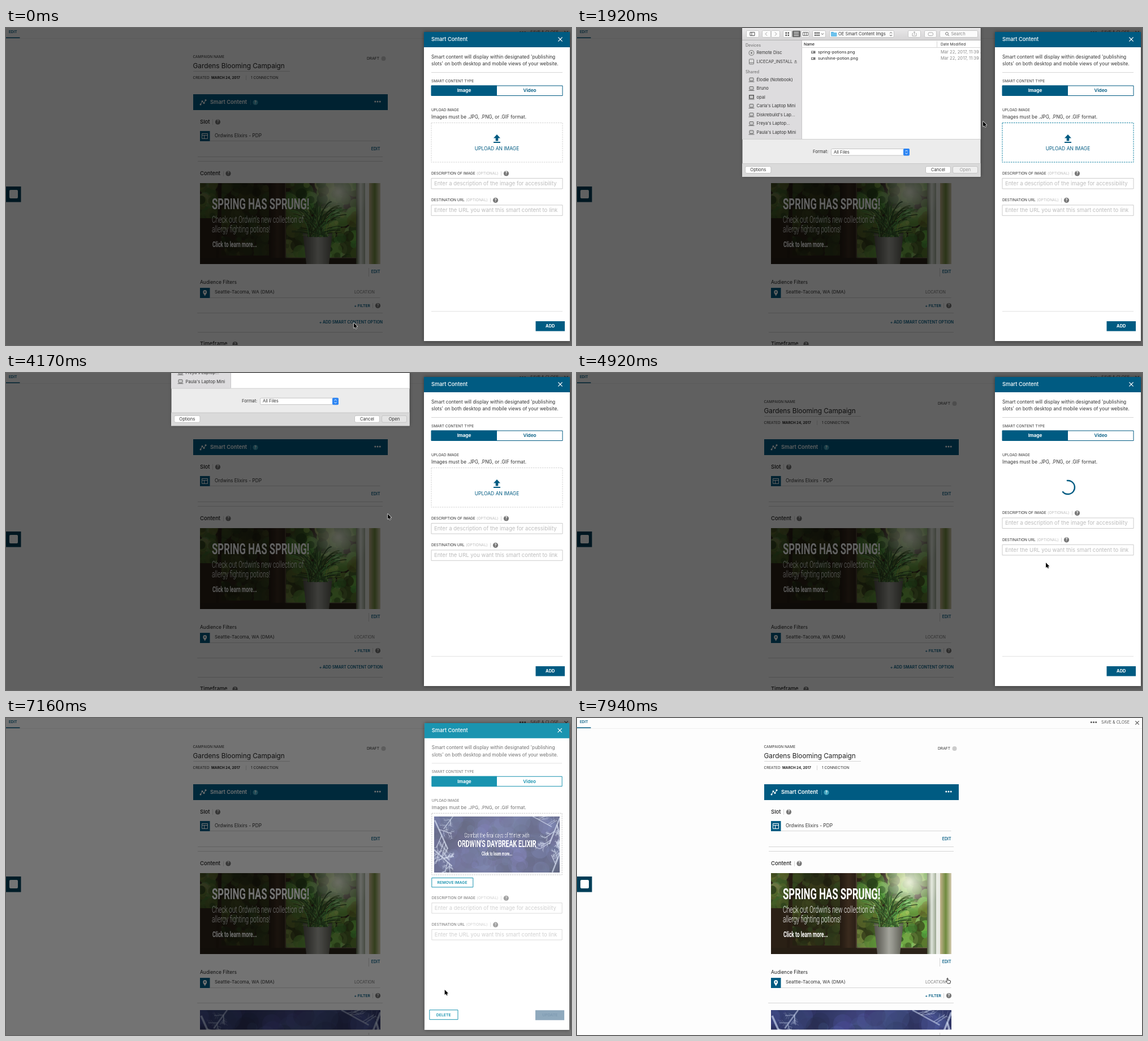
An HTML page with a canvas for the animation above (8 s loop, 999 by 560 pixels).

```html
<!DOCTYPE html>
<html lang="en">
<head>
<meta charset="utf-8">
<title>Smart Content</title>
<style>
html, body { margin: 0; width: 999px; height: 560px; overflow: hidden; background: #fdfdfd; }
canvas { display: block; }
</style>
</head>
<body>
<canvas id="stage" width="999" height="560"></canvas>
<script>
const BLUE = '#005b82', TEAL = '#1a94b0', INK = '#333', RULE = '#d6d6d6';
const LOOP = 8000, STEP = 150;
const stage = document.getElementById('stage').getContext('2d');
let c = stage;

// ---- drawing helpers ----
function box(x, y, w, h, fill, stroke, r = 0) {
  c.beginPath();
  c.roundRect(x, y, w, h, r);
  if (fill) { c.fillStyle = fill; c.fill(); }
  if (stroke) { c.strokeStyle = stroke; c.lineWidth = 1; c.stroke(); }
}
function line(color, width, ...p) {
  c.beginPath();
  for (let i = 0; i < p.length; i += 2) c.lineTo(p[i], p[i + 1]);
  c.strokeStyle = color;
  c.lineWidth = width;
  c.stroke();
}
function dot(x, y, r, color) {
  c.beginPath();
  c.arc(x, y, r, 0, 7);
  c.fillStyle = color;
  c.fill();
}
function text(s, x, y, size, color = INK, weight = 400, align = 'left', face = 'Inter') {
  c.font = `${weight} ${size}px ${face}, sans-serif`;
  c.textAlign = align;
  c.textBaseline = 'middle';
  c.fillStyle = color;
  c.fillText(s, x, y);
  return c.measureText(s).width;
}
function condensed(s, x, y, size, weight, align) {
  c.save();
  c.translate(x, y);
  c.scale(.62, 1);
  text(s, 0, 0, size, '#fff', weight, align, 'Roboto');
  c.restore();
}
function help(x, y, color = '#777') {
  dot(x, y, 4.6, color);
  text('?', x, y + .3, 7, '#fff', 700, 'center');
}
function cross(x, y, r, color) {
  line(color, 1.2, x - r, y - r, x + r, y + r);
  line(color, 1.2, x + r, y - r, x - r, y + r);
}
function ellipsis(x, y, color) {
  for (let i = -1; i < 2; i++) dot(x + i * 4.2, y, 1.5, color);
}
function polygon(color, ...p) {
  c.beginPath();
  for (let i = 0; i < p.length; i += 2) c.lineTo(p[i], p[i + 1]);
  c.fillStyle = color;
  c.fill();
}

// ---- banners, 319 x 143, painted once ----
let seed;
const rnd = () => (seed = seed * 16807 % 2147483647) / 2147483647;

function bake(start, paint) {
  const cv = document.createElement('canvas');
  cv.width = 638;
  cv.height = 286;
  c = cv.getContext('2d');
  c.scale(2, 2);
  seed = start;
  paint();
  c = stage;
  return cv;
}
function blobs(x, y, w, h, n, size, color) {
  c.save();
  c.beginPath();
  c.rect(x, y, w, h);
  c.clip();
  for (let i = 0; i < n; i++) dot(x + rnd() * w, y + rnd() * h, size * (.3 + rnd()), color());
  c.restore();
}
function gradient(x1, y1, x2, y2, ...colors) {
  const g = c.createLinearGradient(x1, y1, x2, y2);
  colors.forEach((k, i) => g.addColorStop(i / (colors.length - 1), k));
  return g;
}

const spring = bake(77, () => {
  const leaf = (lo, span) => () => `hsla(${72 + rnd() * 38},45%,${lo + rnd() * span}%,.75)`;
  box(0, 0, 319, 143, '#33271b');
  blobs(0, 0, 32, 62, 70, 9, leaf(20, 45));
  blobs(38, 0, 84, 128, 160, 10, leaf(9, 32));
  blobs(152, 0, 128, 132, 240, 11, leaf(18, 42));
  box(122, 0, 30, 143, gradient(122, 0, 152, 0, '#241a13', '#513c2b', '#2b2018'));
  line('#8a765c', 1.2, 151, 0, 151, 132);
  line('#2a1f15', 5, 36, 0, 30, 143);
  box(0, 132, 319, 11, '#2b2319');
  line('#796b56', 1, 152, 132, 300, 132);
  box(276, 0, 16, 143, gradient(276, 0, 292, 0, '#4e5a3c', '#dfe5dc', '#9aa690'));
  box(299, 0, 20, 143, gradient(299, 0, 319, 0, '#c3b38e', '#6f8a3e', '#d7ccb2'));
  box(292, 0, 7, 143, '#e8ebe4');
  const glow = c.createRadialGradient(245, 16, 2, 245, 16, 55);
  glow.addColorStop(0, 'rgba(255,255,240,.85)');
  glow.addColorStop(1, 'rgba(255,255,240,0)');
  box(190, 0, 110, 80, glow);
  polygon(gradient(183, 0, 234, 0, '#62635c', '#a9aaa2', '#5a5a50'), 182, 88, 234, 88, 228, 143, 188, 143);
  for (let i = 0; i < 110; i++) {
    const x = 158 + rnd() * 104, y = 32 + rnd() * 60;
    c.beginPath();
    c.moveTo(190 + rnd() * 36, 95);
    c.quadraticCurveTo(208 + (x - 208) * .4, y, x, y);
    c.strokeStyle = `hsl(${85 + rnd() * 30},36%,${15 + rnd() * 36}%)`;
    c.lineWidth = 1.3;
    c.stroke();
  }
  box(0, 0, 319, 143, gradient(0, 0, 215, 0, 'rgba(34,25,16,.45)', 'rgba(34,25,16,.68)', 'rgba(34,25,16,0)'));
  condensed('SPRING HAS SPRUNG!', 21, 38, 27, 600);
  condensed("Check out Ordwin's new collection of", 21, 65, 16.4, 300);
  condensed('allergy fighting potions!', 21, 82, 16.4, 300);
  condensed('Click to learn more...', 22, 109, 13.6, 700);
});

function twig(x, y, angle, len, depth) {
  const x2 = x + Math.cos(angle) * len, y2 = y + Math.sin(angle) * len;
  line(`rgba(205,217,240,${.28 + depth * .13})`, .8 + depth * .9, x, y, x2, y2);
  if (!depth) return;
  for (let i = 0; i < 5; i++) {
    const k = .2 + rnd() * .8;
    twig(x + (x2 - x) * k, y + (y2 - y) * k, angle + (rnd() < .5 ? -1 : 1) * (.5 + rnd() * .6), len * .42, depth - 1);
  }
}
const frost = bake(31, () => {
  box(0, 0, 319, 143, gradient(0, 0, 319, 143, '#1c2146', '#454d83', '#20264f'));
  blobs(0, 0, 319, 143, 150, 20, () => `hsla(${222 + rnd() * 25},34%,${18 + rnd() * 34}%,.28)`);
  twig(2, 10, 1.15, 80, 3);
  twig(0, 85, .75, 62, 3);
  twig(48, 0, 2.2, 40, 2);
  twig(319, 4, 1.95, 72, 3);
  twig(300, 143, -1.2, 62, 3);
  twig(250, 0, .5, 55, 2);
  condensed('Combat the final days of Winter with', 159.5, 49, 16.8, 300, 'center');
  condensed("ORDWIN'S DAYBREAK ELIXIR", 159.5, 71, 24.5, 600, 'center');
  condensed('Click to learn more...', 159.5, 96, 13.4, 700, 'center');
});

// ---- campaign page ----
function tile(y) { box(343, y, 17.5, 18, BLUE); }

function page(added) {
  box(0, 0, 999, 560, '#fdfdfd');
  line('#efefef', 1, 0, 18.5, 999, 18.5);
  text('EDIT', 5, 7.5, 6.4, BLUE, 600);
  box(0, 16.5, 24.5, 1.5, BLUE);
  ellipsis(913.5, 7.5, '#555');
  text('SAVE & CLOSE', 927, 8, 7.1, '#555');
  cross(990.5, 8.5, 3.2, '#555');

  text('CAMPAIGN NAME', 330.5, 51.5, 6.5);
  text('Gardens Blooming Campaign', 330.5, 67.5, 11.8, '#222');
  line(RULE, 1, 331, 76.5, 502, 76.5);
  text('CREATED', 330.5, 88, 6.4);
  text('MARCH 24, 2017', 363, 88, 6.2, '#222', 700);
  line(RULE, 1, 424.5, 84, 424.5, 92);
  text('1 CONNECTION', 433, 88, 6.5);
  text('DRAFT', 638, 54, 6.7);
  dot(667.5, 54, 4, '#ccc');

  box(331, 117, 344, 28, BLUE);
  line('#fff', 1, 344, 135, 347, 129.5, 350, 132.5, 353, 127.5);
  [[344, 135], [347, 129.5], [350, 132.5], [353, 127.5]].forEach(p => dot(...p, 1.5, '#fff'));
  text('Smart Content', 361, 131.5, 9.3, '#fff', 600);
  line('#2f7d9c', 1, 432.5, 127, 432.5, 136);
  help(441, 131.5, '#3fa3bd');
  ellipsis(657, 130, '#fff');

  text('Slot', 343, 166.5, 9.5, '#222', 500);
  line(RULE, 1, 365.5, 161, 365.5, 171);
  help(374.5, 166);
  tile(182);
  box(346.5, 186.5, 10, 9, null, '#fff');
  line('#fff', 1, 346.5, 189.5, 356.5, 189.5);
  line('#fff', 1, 350.5, 189.5, 350.5, 195.5);
  text('Ordwins Elixirs - PDP', 369, 191, 8.3);
  line(RULE, 1, 361, 199.5, 661.5, 199.5);
  text('EDIT', 661.5, 214, 7, BLUE, 600, 'right');
  line(RULE, 1, 339, 227.5, 666, 227.5);
  line(RULE, 1, 339, 235.5, 666, 235.5);

  text('Content', 343, 257.5, 9.5, '#222', 500);
  line(RULE, 1, 384.5, 253, 384.5, 262);
  help(393, 257);
  c.drawImage(spring, 343, 274, 319, 143);
  line(RULE, 1, 641.5, 424, 641.5, 439);
  text('EDIT', 661.5, 431, 7, BLUE, 600, 'right');
  text('Audience Filters', 343, 449.5, 8.5, '#222');
  tile(459);
  dot(351.7, 466.5, 3.4, '#fff');
  polygon('#fff', 348.5, 468, 354.9, 468, 351.7, 473.5);
  dot(351.7, 466.5, 1.3, BLUE);
  text('Seattle-Tacoma, WA (DMA)', 369, 467, 8.2);
  text('LOCATION', 616, 467, 7.1, '#777');
  line(RULE, 1, 361, 476.5, 661.5, 476.5);
  text('+ FILTER', 644, 490.5, 6.8, BLUE, 600, 'right');
  line(RULE, 1, 648.5, 486, 648.5, 495);
  help(657.5, 490.5);
  line(RULE, 1, 338, 503.5, 666, 503.5);

  if (added) {
    c.save();
    c.beginPath();
    c.rect(343, 516, 319, 34.5);
    c.clip();
    c.drawImage(frost, 343, 516, 319, 143);
    c.restore();
    line(RULE, 1, 641.5, 556, 641.5, 560);
  } else {
    text('+ ADD SMART CONTENT OPTION', 666, 520, 6.9, BLUE, 600, 'right');
    line(RULE, 1, 339, 537.5, 666, 537.5);
    text('Timeframe', 343, 558.5, 9.4, '#222', 500);
    help(405, 558.5);
  }
  box(0, 280, 26.5, 27.5, '#003d57');
  box(6, 286, 15, 15, '#fff', null, 2);
}

// ---- side panel ----
function field(label, hint, y) {
  let x = 752 + text(label, 752, y, 6.6, INK) + 2.5;
  x += text('(OPTIONAL)', x, y, 6.6, '#bbb') + 5;
  line(RULE, 1, x, y - 4, x, y + 4);
  help(x + 9, y);
  box(752, y + 8.5, 232, 18.5, '#fff', '#ccc');
  text(hint, 757, y + 18, 9.5, '#bcbcbc');
}

function panel(t, edit) {
  const main = edit ? TEAL : BLUE;
  const loading = t >= 4320 && t < 5220, loaded = t >= 5220;
  c.save();
  c.shadowColor = 'rgba(0,0,0,.45)';
  c.shadowBlur = 6;
  box(739, 7, 258, 546, '#fff');
  c.restore();
  box(739, 7, 258, 27, main);
  text('Smart Content', 752, 20.5, 9.3, '#fff', 500);
  cross(980, 20, 3.6, '#fff');

  c.save();
  if (edit) c.globalAlpha *= .7;
  text("Smart content will display within designated 'publishing", 752, 51, 8.4);
  text("slots' on both desktop and mobile views of your website.", 752, 63.5, 8.4);
  line(RULE, 1, 752, 78.5, 984, 78.5);
  text('SMART CONTENT TYPE', 752, 94, 6.5);
  text('UPLOAD IMAGE', 752, 145, 6.5);
  text('Images must be .JPG, .PNG, or .GIF format.', 752, 157.5, 8.25);

  if (loading) {
    const a = (t - 4920) / 1000 * 2 * Math.PI - 1.75;
    c.beginPath();
    c.arc(868, 202, 12, a, a + 4.25);
    c.strokeStyle = main;
    c.lineWidth = 2.4;
    c.stroke();
  } else {
    const hover = t >= 720 && t < 2220;
    c.setLineDash([2.5, 1.5]);
    box(752, 167.5, 232, loaded ? 109.5 : 69.5, null, hover ? '#1683a3' : loaded ? '#aaa' : '#d2d2d2');
    c.setLineDash([]);
    if (loaded) {
      c.save();
      c.globalAlpha *= Math.min(1, .4 + (t - 5220) / 500);
      c.drawImage(frost, 756, 173, 224, 99.5);
      c.restore();
    } else {
      polygon(main, 868, 188, 874, 194.5, 870.3, 194.5, 870.3, 199.5, 865.7, 199.5, 865.7, 194.5, 862, 194.5);
      box(862, 201, 12, 2, main);
      text('UPLOAD AN IMAGE', 868, 213.5, 8.5, main, 400, 'center');
    }
  }
  const dy = loading ? -9.5 : loaded ? 61.5 : 0;
  field('DESCRIPTION OF IMAGE', 'Enter a description of the image for accessibility', 257 + dy);
  field('DESTINATION URL', 'Enter the URL you want this smart content to link', 304.3 + dy);
  c.restore();

  box(752, 102, 232, 17.5, '#fff', main);
  box(752, 101.5, 116, 18.5, main);
  text('Image', 810, 111, 8.2, '#fff', 700, 'center');
  text('Video', 926, 111, 8.2, main, 600, 'center');
  if (loaded) {
    box(752, 282.5, 73.5, 16.5, '#fff', main);
    text('REMOVE IMAGE', 788.5, 291, 6.9, main, 600, 'center');
  }
  if (edit) {
    box(748, 517.5, 50.5, 17, '#fff', main);
    text('DELETE', 773, 526.3, 6.9, main, 600, 'center');
    box(936.5, 518, 51.5, 17.5, '#8fa9bd');
    text('UPDATE', 962.5, 526.8, 6.9, '#7f9bb2', 600, 'center');
  } else {
    line('#e2e2e2', 1, 752, 500.5, 984, 500.5);
    box(936.5, 518, 51.5, 17.5, t >= 6410 ? '#00496a' : BLUE);
    text('ADD', 962.3, 526.8, 7.5, '#fff', 700, 'center');
  }
}

// ---- file chooser ----
const shared = ['Élodie (Notebook)', 'Bruno', 'opal', "Carla's Laptop Mini", "Diskrebuild's Lap...", "Freya's Laptop...", "Paula's Laptop Mini"];

function button(label, x, w, color = INK, fill = '#fff') {
  box(x + .5, 244.5, w, 12, fill, '#c4c4c4', 2.5);
  text(label, x + w / 2 + .5, 250.5, 7.6, color, 400, 'center');
}
function laptop(x, y, color = '#666') {
  box(x - 3.5, y - 3.5, 7, 5.5, '#ccc', color, 1);
  line(color, 1, x - 5, y + 3.5, x + 5, y + 3.5);
}

function fileRow(name, y, on) {
  if (on) box(397, y - 5.3, 316, 10.6, '#0b59d6');
  box(414, y - 2, 7.5, 4.5, '#777');
  box(415, y - 1, 3, 2, '#eee');
  text(name, 426, y, 7.25, on ? '#fff' : '#222');
  text('Mar 22, 2017, 11:39 AM', 643, y, 7.6, on ? '#fff' : '#888');
}

function chooser(y, picked) {
  c.save();
  c.beginPath();
  c.rect(285, 0, 436, 270);
  c.clip();
  c.translate(0, y);
  c.save();
  c.shadowColor = 'rgba(0,0,0,.5)';
  c.shadowBlur = 5;
  box(292.5, -5, 421, 267, '#ececec');
  c.restore();
  c.beginPath();
  c.rect(292, -5, 421.5, 268);
  c.clip();

  box(292, -5, 422, 26.5, gradient(0, 0, 0, 21, '#e9e8e9', '#d5d4d5'));
  line('#b4b4b4', 1, 292, 21.5, 714, 21.5);
  [[299, 22], [327, 15], [343, 15], [364, 15], [380, 15], [396, 14], [416, 23], [446, 114], [585, 22], [614, 21], [641, 67]]
    .forEach(([x, w]) => box(x + .5, 4.5, w, 12, x === 380 ? '#666' : '#fbfbfb', '#c6c6c6', 2));
  box(306, 7.5, 8, 6, null, '#555');
  line('#555', 1, 309, 7.5, 309, 13.5);
  line('#999', 1, 336, 7.5, 333, 10.5, 336, 13.5);
  line('#999', 1, 350, 7.5, 353, 10.5, 350, 13.5);
  for (let i = 0; i < 3; i++) {
    line('#fff', 1, 383.5, 7.5 + i * 3, 392, 7.5 + i * 3);
    box(399.5 + i * 3, 7.5, 3, 6, null, '#666');
    for (let j = 0; j < 2; j++) {
      if (i < 2) box(368.5 + i * 4, 7.5 + j * 4, 2.5, 2.5, '#555');
      box(420 + i * 3.3, 7.5 + j * 4, 2.3, 2.5, '#555');
    }
  }
  line('#555', 1, 432, 9.5, 434, 11.5, 436, 9.5);
  box(449, 7, 5, 3, '#45a8dd', null, 1);
  box(449, 8, 10.5, 7, '#6cc1ec', null, 1);
  text('OE Smart Content Imgs', 462, 10.5, 7.6);
  line('#555', 1, 553, 9.5, 555, 7.5, 557, 9.5);
  line('#555', 1, 553, 12, 555, 14, 557, 12);
  const tool = picked ? '#555' : '#aaa';
  line(tool, 1, 594, 9.5, 593, 9.5, 593, 14, 600, 14, 600, 9.5, 599, 9.5);
  line(tool, 1, 596.5, 12, 596.5, 6.5);
  line(tool, 1, 594.8, 8, 596.5, 6.3, 598.2, 8);
  box(621, 8, 8.5, 5.5, null, tool, 2);
  c.beginPath();
  c.arc(654, 10, 2.4, 0, 7);
  c.strokeStyle = '#777';
  c.stroke();
  line('#777', 1, 656, 12, 658, 14);
  text('Search', 661.5, 10.5, 7.6, '#888');

  box(292, 22, 105, 174.5, '#dddcde');
  text('Devices', 298, 31, 7.1, '#777', 500);
  dot(308.5, 44, 5, '#888');
  dot(308.5, 44, 3.8, '#ddd');
  dot(308.5, 44, 1.6, '#777');
  text('Remote Disc', 317.5, 44, 7.6);
  box(304.5, 55, 8, 9, '#ddd', '#777', 1);
  line('#777', 1, 304.5, 61.5, 312.5, 61.5);
  text('LICECAP_INSTALL', 317.5, 59.5, 7.3);
  polygon('#777', 384, 59.5, 389, 59.5, 386.5, 56.5);
  line('#777', 1, 384, 61.5, 389, 61.5);
  text('Shared', 298, 78, 7.1, '#777', 500);
  shared.forEach((name, i) => {
    const cy = 91.5 + i * 15.5;
    if (i === 2) box(304.5, cy - 4, 8, 6, '#555', '#444');
    laptop(308.5, cy);
    text(name, 317.5, cy, 7.55);
  });

  box(397, 22, 317, 174.5, '#fff');
  line('#c8c8c8', 1, 397.5, 22, 397.5, 196);
  text('Name', 401, 28.5, 6.8, '#222', 500);
  text('Date Modified', 643, 28.5, 6.7, '#333');
  line('#d5d5d5', 1, 636.5, 23, 636.5, 34);
  line('#d5d5d5', 1, 397, 34.5, 714, 34.5);
  fileRow('spring-potions.png', 42.5, false);
  fileRow('sunshine-potion.png', 53.7, picked);

  line('#cfcfcf', 1, 292, 196.5, 714, 196.5);
  text('Format:', 417, 218.5, 7.6);
  box(449.5, 213.5, 138, 11.5, '#fff', '#c4c4c4', 2);
  text('All Files', 454, 219.3, 7.6);
  box(577, 213, 11, 12.5, '#2f86f3', null, 2);
  line('#fff', 1, 580.5, 218, 582.5, 216, 584.5, 218);
  line('#fff', 1, 580.5, 220.5, 582.5, 222.5, 584.5, 220.5);
  box(292, 239, 422, 24, '#dadada');
  line('#c8c8c8', 1, 292, 239.5, 714, 239.5);
  button('Options', 297, 45.5);
  button('Cancel', 616, 44);
  button('Open', 664, 44, picked ? INK : '#999', picked ? '#e4e4e4' : '#efefef');
  c.restore();
}

// ---- pointer ----
const path = [
  [0, 615, 521], [150, 677, 484], [420, 700, 440], [720, 835, 222], [1170, 835, 222],
  [1920, 718, 165], [2070, 714, 158], [2820, 470, 50], [3120, 470, 50], [3420, 482, 62],
  [3870, 675, 249], [4170, 675, 249], [4920, 829, 335], [5220, 835, 350], [5520, 838, 354],
  [6260, 942, 502], [6410, 957, 518], [6860, 957, 518], [7310, 685, 461], [7700, 653, 459], [8000, 653, 459]
];
const arrow = new Path2D('M0 0V9L2.1 7.2 3.6 10.2 5 9.5 3.7 6.8 6.4 6.5Z');
const hand = new Path2D('M1.2 1Q2.2 -.4 2.9 1V4L7 5Q7.8 5.4 7.4 7L6.6 10H2.4L-.8 6.6Q-.6 5.2 1.2 6.4Z');

function pointer(t) {
  const i = path.findIndex(p => p[0] > t), a = path[i - 1], b = path[i];
  const k = (t - a[0]) / (b[0] - a[0]);
  const overLink = t >= 720 && t < 1320 || t >= 7700;
  c.save();
  c.translate(a[1] + (b[1] - a[1]) * k, a[2] + (b[2] - a[2]) * k);
  c.lineJoin = 'round';
  c.lineWidth = overLink ? .9 : 1.2;
  c.strokeStyle = overLink ? '#111' : '#fff';
  c.fillStyle = overLink ? '#fff' : '#000';
  const shape = overLink ? hand : arrow;
  if (overLink) { c.fill(shape); c.stroke(shape); } else { c.stroke(shape); c.fill(shape); }
  c.restore();
}

// ---- timeline: bursts of movement on a coarse clock, still in between ----
const bursts = [[0, 150], [420, 720], [1170, 2070], [2220, 3120], [3270, 4170], [4320, 5220], [5360, 6410], [6560, 7460], [7700, 7700], [7940, 7940]];
const clamp = v => Math.max(0, Math.min(1, v));

function tick(t) {
  const [from, to] = bursts.findLast(b => b[0] <= t);
  return from + Math.floor((Math.min(t, to) - from) / STEP) * STEP;
}

function draw(now) {
  const t = tick(Math.max(0, now) % LOOP);
  const edit = t >= 7010, leave = clamp((t - 7100) / 500);
  page(edit);
  if (leave < 1) {
    box(0, 0, 999, 560, `rgba(0,0,0,${.62 * (1 - leave)})`);
    c.save();
    c.globalAlpha = Math.min(1, (1 - leave) * 1.75);
    c.translate(868, 280);
    c.scale(1 - .06 * leave, 1 - .06 * leave);
    c.translate(-868, -280);
    panel(t, edit);
    c.restore();
  }
  const shown = clamp((t - 1250) / 350) - clamp((t - 3930) / 380);
  if (shown > 0) chooser(-268 * (1 - shown), t >= 2820);
  pointer(t);
  requestAnimationFrame(draw);
}
requestAnimationFrame(draw);
</script>
</body>
</html>
```
